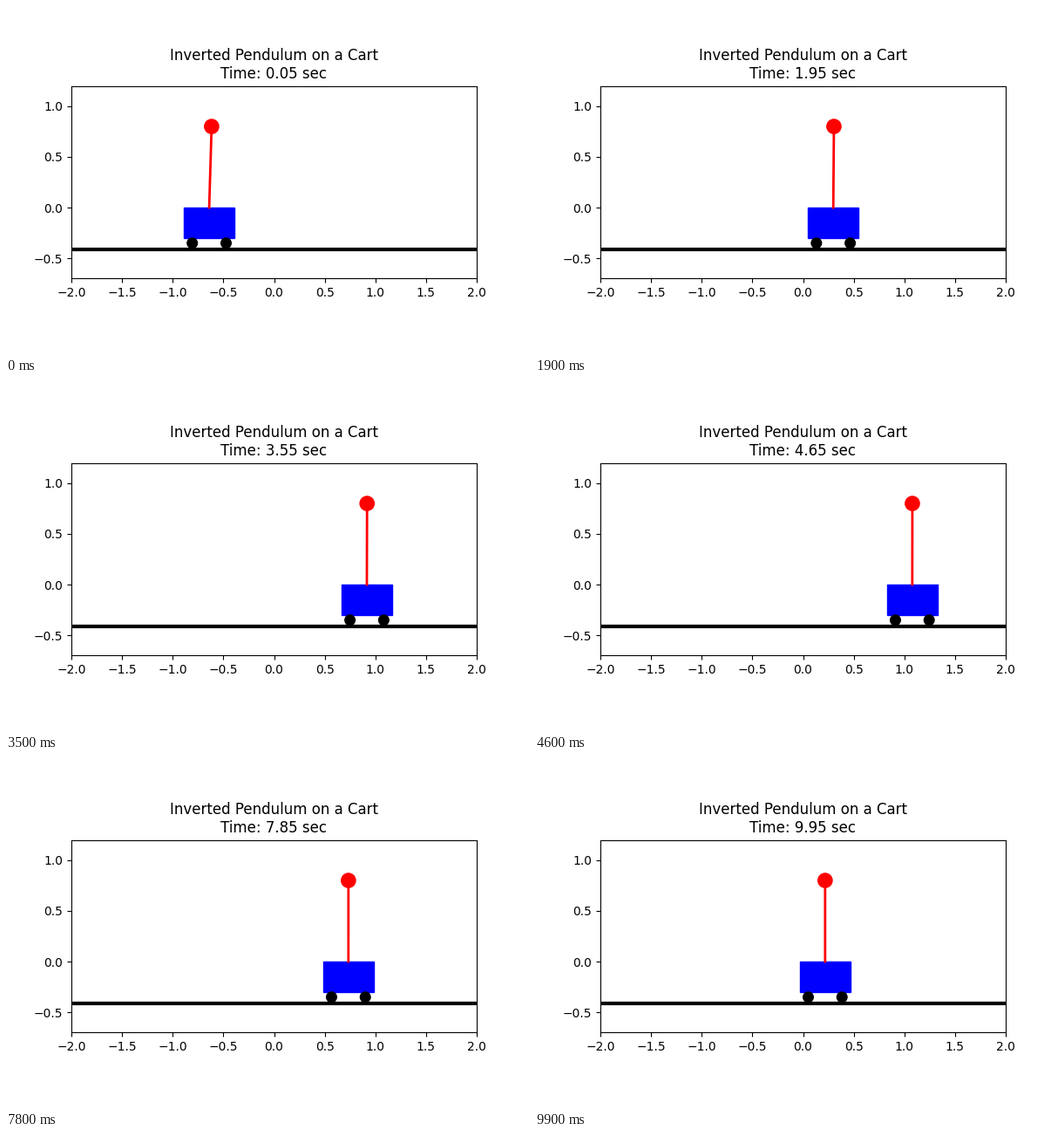
Recreate the animation shown at these times as a matplotlib script. Size 600 px wide and 400 px high, loop 10000 ms.

```python
import numpy as np
import matplotlib.pyplot as plt
from matplotlib.animation import FuncAnimation
from matplotlib.patches import Circle, Rectangle

FRAMES, STEP = 100, 0.1
CART_W, CART_H = 0.5, 0.3
WHEEL_R, BALL_R = 0.05, 0.07
POLE = 0.8

# Key poses of the cart: time, position, velocity.
KEYS = [
    (0.05, -0.640, 0.49), (1.95, 0.2985, 0.505), (3.55, 0.916, 0.22),
    (5.20, 1.105, 0.02), (7.85, 0.734, -0.26), (9.95, 0.218, -0.19),
]


def cart_x(t):
    """Cubic Hermite motion between the key poses."""
    k = sum(t >= key[0] for key in KEYS[1:-1])
    (t0, x0, v0), (t1, x1, v1) = KEYS[k:k + 2]
    h = t1 - t0
    s = (t - t0) / h
    ease = s * s * (3 - 2 * s)
    return (x0 + (x1 - x0) * ease
            + h * s * (1 - s) * (v0 * (1 - s) - v1 * s))


def tilt(t):
    return 0.031 * np.exp(-0.7 * t)


fig, ax = plt.subplots(figsize=(6, 4), dpi=100)
ax.set_aspect("equal")
ax.set_xlim(-2, 2)
ax.set_ylim(-0.7, 1.2)

cart = ax.add_patch(Rectangle((0, -CART_H), CART_W, CART_H, color="blue"))
wheels = [ax.add_patch(Circle((0, 0), WHEEL_R, color="black"))
          for _ in range(2)]
ball = ax.add_patch(Circle((0, 0), BALL_R, color="red", zorder=3))
pole, = ax.plot([], [], color="red", lw=2)
ax.axhline(-0.41, color="black", lw=3)
title = ax.set_title("")


def update(i):
    t = i * STEP + 0.05
    x, a = cart_x(t), tilt(t)
    tip = x + POLE * np.sin(a), POLE * np.cos(a)
    cart.set_x(x - CART_W / 2)
    for wheel, side in zip(wheels, (-1, 1)):
        wheel.center = x + side * CART_W / 3, -CART_H - WHEEL_R
    pole.set_data([x, tip[0]], [0, tip[1]])
    ball.center = tip
    title.set_text(f"Inverted Pendulum on a Cart\nTime: {t:.2f} sec")
    return [cart, *wheels, pole, ball, title]


anim = FuncAnimation(fig, update, frames=FRAMES, interval=1000 * STEP,
                     repeat=True, repeat_delay=0, blit=False)
plt.show()
```
